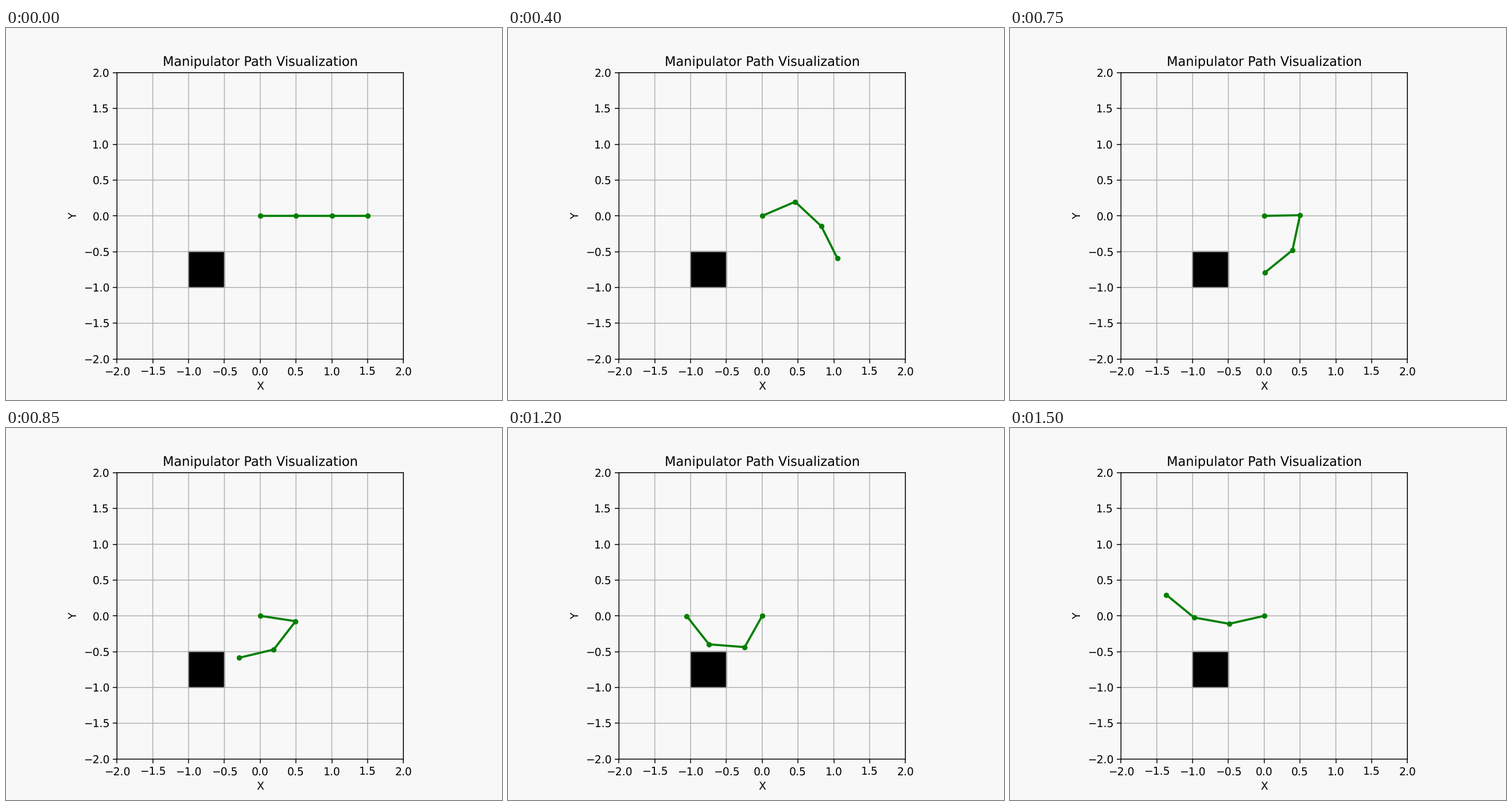
Recreate the animation shown at these times as a matplotlib script. Size 864x648 px, loop 1.55 s.

```python
import numpy as np
import matplotlib.pyplot as plt
from matplotlib.animation import FuncAnimation
from matplotlib.patches import Rectangle

FRAMES = 31
INTERVAL = 50
LINK = 0.5
PAPER = "#f8f8f8"

# Key poses of the planned path: step -> relative joint angles in degrees
POSES = {
    0: (0, 0, 0),
    8: (23.2, -66.2, -20.4),
    12: (15.5, -79.3, -38.7),
    17: (-8.6, -119.1, -38.9),
    21: (-76.9, -107.7, -37.8),
    26: (-147.5, -36.8, -53.6),
    30: (-167.2, -22.9, -29.2),
}

# Smooth, unsnapped lines and glyphs
plt.rcParams.update({"path.snap": False, "text.hinting": "none"})


def arm_points(step):
    """Joint positions of the arm, base first."""
    steps = list(POSES)
    joints = [np.interp(step, steps, angles) for angles in zip(*POSES.values())]
    heading = np.radians(np.cumsum(joints))
    x = np.append(0, np.cumsum(LINK * np.cos(heading)))
    y = np.append(0, np.cumsum(LINK * np.sin(heading)))
    return x, y


fig, ax = plt.subplots(figsize=(6.4, 4.8), dpi=135, facecolor=PAPER)
ax.set_facecolor(PAPER)
ax.set(xlim=(-2, 2), ylim=(-2, 2), aspect="equal", xlabel="X", ylabel="Y",
       title="Manipulator Path Visualization")
ax.grid(True)
ax.add_patch(Rectangle((-1, -1), 0.5, 0.5, color="black"))
arm, = ax.plot([], [], "o-", color="green", lw=2, markersize=4)


def update(step):
    arm.set_data(*arm_points(step))
    return arm,


anim = FuncAnimation(fig, update, frames=FRAMES, interval=INTERVAL,
                     repeat=True, repeat_delay=0)
plt.show()
```
